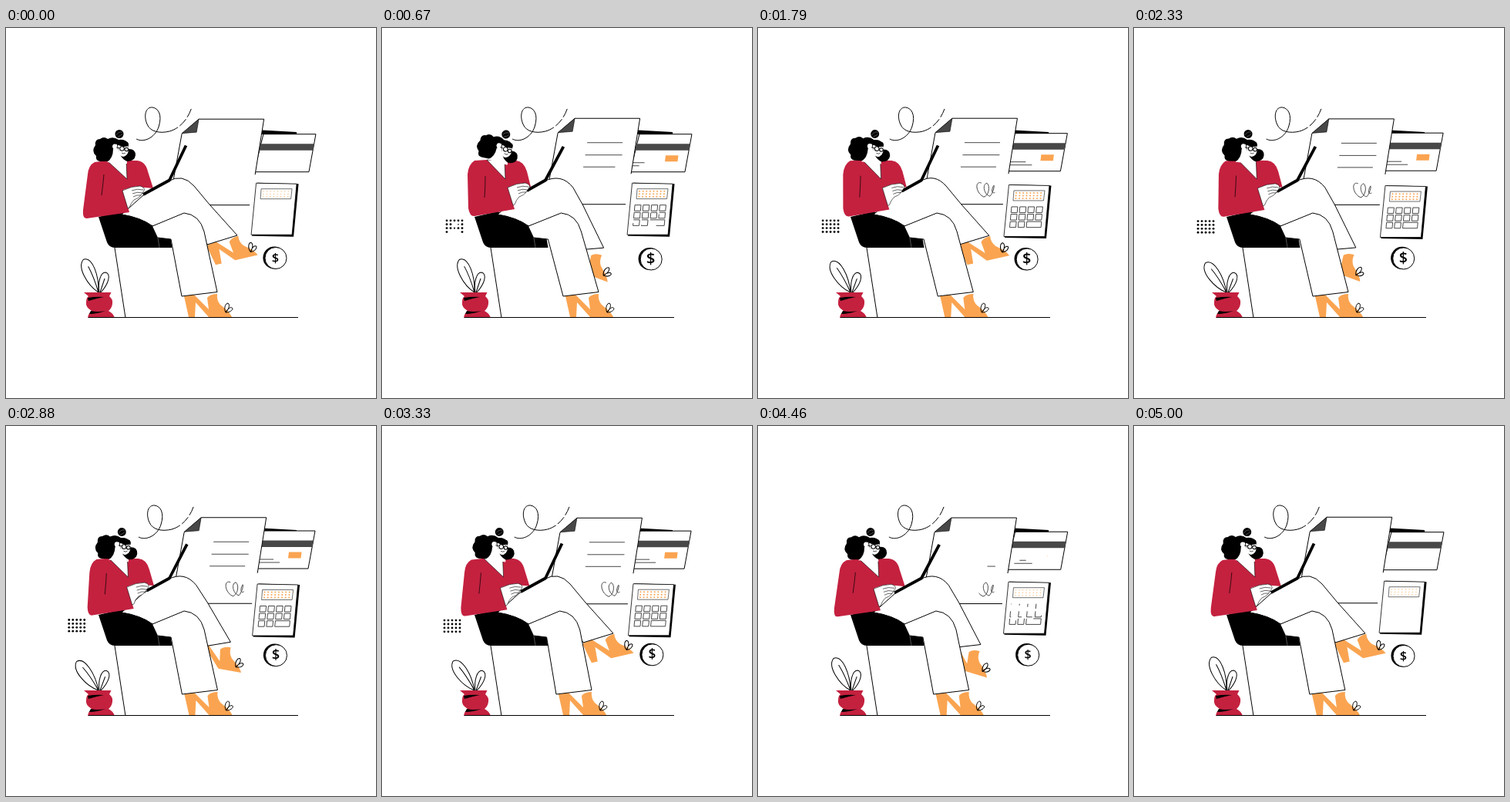
An HTML page with a canvas for the animation above (5.04 s loop, 480 by 480 pixels).

```html
<!DOCTYPE html>
<html lang="en">
<head>
<meta charset="utf-8">
<style>
html, body { margin: 0; width: 100%; height: 100%; overflow: hidden; background: #fff; }
canvas { display: block; }
</style>
</head>
<body>
<canvas id="stage" width="480" height="480"></canvas>
<script>
const ctx = document.getElementById('stage').getContext('2d');
const LOOP = 5040, TAU = Math.PI * 2;
const RED = '#c4213f', ORANGE = '#faa451', GRAY = '#484849', LINE = 1;

const clamp = v => Math.max(0, Math.min(1, v));
const lerp = (a, b, k) => a + (b - a) * k;
const smooth = u => u * u * (3 - 2 * u);
const easeInOut = u => u < .5 ? 2 ** 1.6 * u ** 2.6 : 1 - 2 ** 1.6 * (1 - u) ** 2.6;

// Blend two path strings that share the same commands
function mix(a, b, k) {
  const to = b.match(/-?[\d.]+/g);
  let i = 0;
  return a.replace(/-?[\d.]+/g, n => lerp(+n, +to[i++], k).toFixed(2));
}

// Smooth periodic curve through values at the key times
const KEYS = [0, 670, 1290, 2330, 3330, 3960];
function track(t, values) {
  const n = KEYS.length;
  const time = i => KEYS[(i + n) % n] + LOOP * Math.floor(i / n);
  const val = i => values[(i + n) % n];
  const slope = i => (val(i + 1) - val(i - 1)) / (time(i + 1) - time(i - 1));
  let i = n - 1;
  while (KEYS[i] > t) i--;
  const d = time(i + 1) - time(i), u = (t - time(i)) / d, v = 1 - u;
  return val(i) * (1 + 2 * u) * v * v + val(i + 1) * u * u * (3 - 2 * u)
    + d * u * v * (slope(i) * v - slope(i + 1) * u);
}

function shape(d, fill, stroke, width = LINE) {
  const p = new Path2D(d);
  if (fill) { ctx.fillStyle = fill; ctx.fill(p); }
  if (stroke) { ctx.strokeStyle = stroke; ctx.lineWidth = width; ctx.stroke(p); }
}
const line = (d, color = '#000', width) => shape(d, null, color, width);

function disc(x, y, r, fill, stroke) {
  ctx.beginPath();
  ctx.arc(x, y, r, 0, TAU);
  if (fill) { ctx.fillStyle = fill; ctx.fill(); }
  if (stroke) { ctx.strokeStyle = stroke; ctx.lineWidth = LINE; ctx.stroke(); }
}

function moved(dx, dy, draw, deg = 0, px = 0, py = 0) {
  ctx.save();
  ctx.translate(dx + px, dy + py);
  ctx.rotate(deg * Math.PI / 180);
  ctx.translate(-px, -py);
  draw();
  ctx.restore();
}

// Line that is written in from its start and later erased from its start
function written(d, length, t, tIn, tOut, time) {
  const from = smooth(clamp((t - tOut) / time)), to = smooth(clamp((t - tIn) / time));
  if (to <= from) return;
  ctx.setLineDash([length * (to - from), 999]);
  ctx.lineDashOffset = -length * from;
  line(d, GRAY);
  ctx.setLineDash([]);
}

const shown = (t, tIn, tOut, time) =>
  smooth(clamp((t - tIn) / time)) * (1 - smooth(clamp((t - tOut) / time)));

function card(t) {
  shape('M334,137.5 L402,137.5 L393,186.5 L322,186.5 Z', '#fff', '#000');
  shape('M330,150 L400,150 L398.5,158.5 L328,158.5 Z', GRAY);
  const k = shown(t, 300, 4250, 250);
  if (k) {
    ctx.save();
    ctx.translate(376, 169);
    ctx.scale(k, k);
    shape('M-8,-4 L8.5,-4 L7.5,4 L-9,4 Z', ORANGE);
    ctx.restore();
  }
  written('M324,174.5 H348', 24, t, 450, 4250, 350);
  written('M323,178.5 H356', 33, t, 500, 4300, 450);
}

function paper(t) {
  shape('M250,118 L334.5,118 L317,229.5 L211,229.5 L228,137 Z', '#fff');
  line('M217,197 L228,137 L250,118 H334.5 L323,190 M212,229.5 H316');
  shape('M250,118 L228,136.5 L247,135 Z', GRAY, '#000', .6);
  written('M266,149.5 H312', 46, t, 50, 3830, 450);
  written('M263.5,165.5 H312', 48, t, 160, 4000, 450);
  written('M261,181 H307', 46, t, 310, 4150, 450);
  written('M288,202 C279,198 280,215 291,220 C297,219 300,206 295,202 C288,204 292,218 299,219 C303,215 305,206 304,205 C300,211 301,219 308,212',
    98, t, 1130, 4300, 560);
}

function calculator(t) {
  shape('M326,200.5 L379.5,202 L373,270.5 L319,269.5 Z', '#000');
  shape('M324.5,201 L377,202 L371,268 L318,268 Z', '#fff', '#000', .8);
  shape('M331,208.5 H371 L369.5,221.5 H330 Z', '#fff', '#333', .7);
  const r = .6 + .4 * shown(t, 250, 3800, 450);
  for (let i = 0; i < 24; i++) {
    const row = i >> 3;
    disc(334 + i % 8 * 4.6 - row * .3, 211.6 + row * 3.5, r, ORANGE);
  }
  for (let i = 0; i < 11; i++) {
    const row = i >> 2, w = i === 10 ? 19 : 8;
    const x = 328 + i % 4 * 10.8 - row * .9, y = 229.5 + row * 9.6;
    written(`M${x},${y} h${w} l-.7,7.5 h${-w} Z`, 2 * w + 15.5, t, 230 + i * 22, 4150 + i * 22, 350);
  }
}

function coin(size) {
  disc(348, 298, 14.6, '#000');
  disc(350, 298.5, 14, '#fff', '#000');
  ctx.fillStyle = '#000';
  ctx.font = `600 ${size}px "Open Sans", Lato, sans-serif`;
  ctx.textAlign = 'center';
  ctx.textBaseline = 'middle';
  ctx.fillText('$', 349.5, 299.5);
}

function dots(t, s) {
  for (let i = 0; i < 20; i++) {
    const row = Math.floor(i / 5), h = Math.abs(Math.sin(i * 12.9 + 4) * 437.5) % 1;
    const inner = row === 1 || row === 2;
    const gone = inner ? 3660 + h * 200 : 3750 + h * 520;
    const k = shown(t, 380 + h * 360, gone, 100);
    if (k) disc(84.5 + i % 5 * 5 + 1.9 * (s - 1), 249.5 + row * 4.9 - 1.4 * (s - 1), 1.4 * k, '#000');
  }
}

function plant(w) {
  moved(0, 0, () => {
    line('M120,343 C106,334 92,310 101,300 C113,296 121,322 120,343 M120,343 Q114,322 107,309');
  }, -13.5 * w, 120, 343);
  moved(0, 0, () => {
    line('M121,343 C119,331 122,317 129,317 C137,319 133,332 123,343 M122,343 L128,325');
  }, 2 * w, 120, 343);
  shape('M101,343 H136.5 L134,348 Q139,352 138,358 Q137,364 133,367 Q139,370 141,376 H106 Q107,370 111,367 Q103,362 104,356 Q104,350 107,348 Z', RED);
  shape('M106,350 Q116,348 127,349 Q116,351 107,354 Z', '#000');
  shape('M110,367 Q119,369 129,367 Q118,371 108,371 Z', '#000');
}

function shoe() {
  shape('M-1,0 L12,-2 L31,17 L29,2 Q33,-3 42,-3 Q41,5 46,11 Q59,21 61,27 H31 L14,8 L13,27 H5 Z', ORANGE);
  line('M53,21 C50,15 53,9 56,9 C59,11 57,17 53,21 C56,15 61,13 62,16 C61,20 56,21 53,21');
}

function legs(up, foot) {
  moved(lerp(244, 261, up), lerp(283, 282, up), shoe, lerp(22, -13, up));
  shape(mix(
    'M150,242 L178,217 L210,199 Q233,188 248,207 L260,229 L287,286 L258,288 L240,245 L190,257 Q175,246 150,242 Z',
    'M150,242 L178,217 L210,199 Q229,188 244,205 L264,229 L300,269 L261,281 L240,245 L190,257 Q175,246 150,242 Z',
    up), '#fff', '#000');
  moved(232 + foot, 348, shoe);
  const n = foot * .2;
  const outline = `M190,257 L${231 + n},240 Q${251 + n},242 ${257 + n},264 L${274 + foot},342.5 L${228 + foot},348 L${214 + n},274 L197,272`;
  shape(outline + ' Z', '#fff');
  line('M150,242 Q175,246 190,257');
  line(outline);
}

function torso(b) {
  shape(mix(
    'M115,174 Q107,178 106,190 L100,236 Q99,248 105,247 L160,239 L152,210 L165,206 L180,207 L191,208 L184,186 Q181,173 170,172 L131,172 Z',
    'M120,172 Q112,177 111,190 L112,234 Q114,245 120,244 L172,235 L163,207 L176,202 L186,206 L193,206 L188,186 Q184,173 174,172 L136,171 Z',
    b), RED);
  shape(mix('M131,172 L157,196 L156,172 Z', 'M136,171 L160,196 L159,172 Z', b), '#fff', '#000', .6);
  line(mix('M127,190 Q126,202 124,217', 'M134,192 Q134,204 133,220', b), '#000', .7);
}

function hand() {
  shape('M151,211 Q163,205 174,205 Q181,207 179,211 L175,217 Q172,221 166,223 Q162,227 160,233 L158,234 Z', '#fff', '#000', .6);
  line('M163,211 Q170,208 178,210 M164,215 Q170,212 177,214 M165,219 Q170,216 175,217', '#000', .6);
}

function head() {
  shape('M116,152 Q115,144 122,144 Q127,140 132,144 Q139,140 146,145 Q155,144 159,150 L158,157 Q168,156 168,165 Q167,173 157,173 L122,173 Q116,172 117,166 Q110,160 116,152 Z', '#000');
  shape('M139,157 L145,156 L149,166 Q152,171 157,173 L157,176 L131,174 Q139,169 139,157 Z', '#fff');
  shape('M145,152 L158,153 Q160,160 157,164 Q152,170 147,164 Z', '#fff');
  shape('M144,151 Q138,149 138,154 Q139,159 145,158 Z', '#fff');
  shape('M143,146 L158,148 L159,153 Q150,156 144,150 Z', '#000');
  disc(150.5, 156.5, 2.8, null, '#000');
  disc(156.3, 157.5, 2.3, null, '#000');
  line('M143,155 L148,156 M150,162 Q153,164 155,162', '#000', .7);
  disc(147, 137.5, 5.5, '#000');
  line('M143,139 Q146,134 151,135 M145,141 Q149,140 151,137', '#999', .5);
}

function draw(t) {
  const x = t / LOOP, s = Math.sin(TAU * x);
  const w = (1 - Math.cos(TAU * (x - .07))) / 2;
  const swing = t % 1680 / 840;
  const up = swing < 1 ? 1 - easeInOut(swing) : easeInOut(swing - 1);
  const body = track(t, [0, 1, .9, .78, .2, 0]);
  const foot = track(t, [0, 7, 6, 4, -2, 0]);
  const headX = track(t, [0, 7, 6, .5, 3.5, 0]);
  const tilt = track(t, [0, 12, 6, 1, 3, 1]);

  ctx.fillStyle = '#fff';
  ctx.fillRect(0, 0, 480, 480);
  ctx.lineJoin = 'round';

  moved(3 * w, 0, () => {
    line('M169,144 C178,149 193,143 198,128 C203,112 197,104 190,103 C181,102 178,114 183,125 C187,135 200,137 212,134');
    ctx.setLineDash([12, 3]);
    line('M212,134 C226,130 236,118 241,102.5');
    ctx.setLineDash([]);
  });

  shape('M332,132.5 L377,135 V138 H332 Z', '#000');
  moved(-w, .3 - 1.8 * w, () => card(t));
  moved(3.2 * w, .2 - 1.3 * s, () => paper(t));
  moved(1.6 * w, 4 * w, () => calculator(t));
  moved(-1.1 * s, 2 * s, () => coin(16.5 + 4 * body));
  dots(t, s);

  plant(w);
  shape('M141,285 H215 L236,376 H155 Z', '#fff');
  line('M141,285 L155,376 M107,375.5 H379');
  shape('M120,245 L131,278 Q134,285 141,285 H215.5 L213,270 L190,250 L150,238 Z', '#000');

  legs(up, foot);
  line('M197,272 L199,285', '#777', .7);
  torso(body);
  line(`M${178 + 10 * body},${216 - 5 * body} L212,197.5 L${235.5 - 2 * up},${154 - 1.5 * up}`, '#000', 3.8);
  moved(12 * body, -4 * body, hand);
  moved(headX, 0, head, tilt, 148, 170);
}

function tick(now) {
  draw(now % LOOP);
  requestAnimationFrame(tick);
}
draw(0);
requestAnimationFrame(tick);
</script>
</body>
</html>
```
